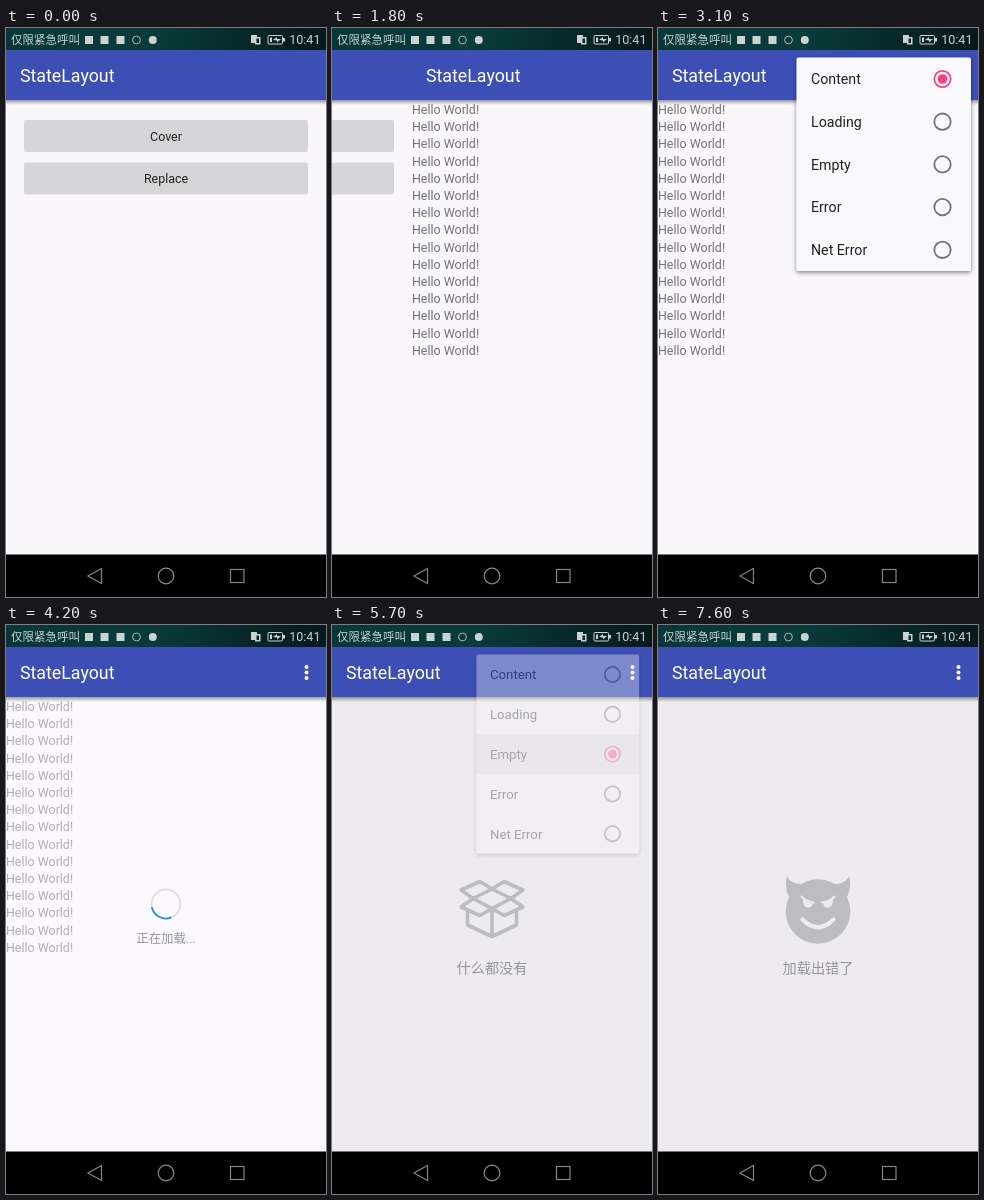
An HTML page that plays this animation: 320x569 px, repeating every 8 s.

```html
<!DOCTYPE html>
<html lang="en">
<head>
<meta charset="utf-8">
<title>State layout demo</title>
<style>
  html, body { margin: 0; width: 100%; height: 100%; overflow: hidden; background: #000; }
  svg { display: block; width: 100%; height: 100%; }
  text { font-family: Roboto, "Noto Sans CJK SC", "Noto Sans CJK", sans-serif; }
  .title { font-size: 17.8px; fill: #fff; }
  .small { font-size: 12.44px; }
  .item { font-size: 14.2px; fill: #212121; }
  .hint { fill: #969597; text-anchor: middle; }
  .nav { fill: none; stroke: #858585; stroke-width: 1.2; }
  .line { fill: none; stroke: #bdbcbe; stroke-width: 3.6; stroke-linejoin: round; }
</style>
</head>
<body>
<svg viewBox="0 0 320 569" preserveAspectRatio="none">
  <defs>
    <linearGradient id="barFill">
      <stop offset="0" stop-color="#06383a"/>
      <stop offset=".45" stop-color="#093b3b"/>
      <stop offset="1" stop-color="#06181b"/>
    </linearGradient>
    <linearGradient id="fade" x2="0" y2="1">
      <stop offset="0" stop-color="#000" stop-opacity=".38"/>
      <stop offset="1" stop-color="#000" stop-opacity="0"/>
    </linearGradient>
    <filter id="lift" x="-10%" y="-10%" width="120%" height="120%">
      <feDropShadow dx="0" dy="1.5" stdDeviation="2" flood-opacity=".5"/>
    </filter>
  </defs>

  <rect id="paper" width="320" height="569"/>
  <rect y="22" width="320" height="50" fill="#3d4fb4"/>
  <rect y="72" width="320" height="5" fill="url(#fade)"/>

  <g id="home">
    <text class="title" x="14" y="54">StateLayout</text>
    <rect id="cover" x="18" y="92" width="284" height="32" rx="2"/>
    <rect x="18" y="134.5" width="284" height="32" rx="2" fill="#d6d5d7"/>
    <g class="small" fill="#222" text-anchor="middle">
      <text x="160" y="112.5">Cover</text>
      <text x="160" y="155.3">Replace</text>
    </g>
  </g>

  <g id="detail">
    <text class="title" x="14" y="54">StateLayout</text>
    <circle id="tap" cx="301" cy="47.5" r="20" fill="#fff" opacity=".16"/>
    <g fill="#fff">
      <circle cx="300.5" cy="42" r="2"/>
      <circle cx="300.5" cy="47.5" r="2"/>
      <circle cx="300.5" cy="53" r="2"/>
    </g>
    <g id="list" class="small" fill="#737274"></g>

    <g id="loading">
      <circle cx="160" cy="279" r="14.5" fill="none" stroke="#dad9db" stroke-width="1.6"/>
      <path id="arc" fill="none" stroke="#2196e3" stroke-width="1.8"/>
      <text class="small hint" x="160" y="317.5">正在加载...</text>
    </g>

    <g id="empty">
      <path class="line" d="M160 264L179 273.5L160 283.5L141 273.5Z
        M141 273.5L129 265L148 256.5L160 264L172 256.5L191 265L179 273.5L191 282L172 290.5L160 283.5L148 290.5L129 282Z
        M135.5 286V300L160 311.5L184.5 300V286 M160 284V311"/>
      <text class="item hint" style="fill:#969597" x="160" y="347.5">什么都没有</text>
    </g>

    <g id="error">
      <g fill="#bdbcbe">
        <circle cx="160" cy="286.5" r="32.3"/>
        <path d="M129 251Q126 262 131 272L146 259Q133 260 129 251Z"/>
        <path d="M191 251Q194 262 189 272L174 259Q187 260 191 251Z"/>
      </g>
      <g fill="none" stroke="#edebee" stroke-linecap="round">
        <path d="M144.5 294.5Q160 310 175.5 294.5" stroke-width="4.2"/>
        <path d="M143.5 271.5Q148 277 156 277.5M176.5 271.5Q172 277 164 277.5" stroke-width="2"/>
      </g>
      <g fill="#edebee">
        <path d="M145 274Q149 278 155 278Q154 283 149.500 282.500Q144.500 281 145 274Z"/>
        <path d="M175 274Q171 278 165 278Q166 283 170.500 282.500Q175.500 281 175 274Z"/>
      </g>
      <text class="item hint" style="fill:#969597" x="160" y="347.5">加载出错了</text>
    </g>
  </g>

  <g id="menu">
    <rect x="138.500" y="29.500" width="174.500" height="213.500" rx="2" fill="#f9f8fa" filter="url(#lift)"/>
    <rect id="ripple" x="138.500" width="174.500" height="42.700" fill="#000" opacity=".09"/>
    <g id="rows"></g>
  </g>

  <rect width="320" height="22" fill="url(#barFill)"/>
  <g fill="#c9d3d3">
    <text x="5" y="16.200" font-size="11.500">仅限紧急呼叫</text>
    <rect x="79" y="8" width="8" height="8"/>
    <rect x="94.500" y="8" width="8" height="8"/>
    <rect x="110.500" y="8" width="8" height="8"/>
    <circle cx="130.500" cy="12" r="3.900" fill="none" stroke="#a9b8b8"/>
    <circle cx="146.800" cy="12" r="4"/>
    <path d="M245 7H251V9H254.500V16.500H249V15H245ZM250.500 10.500V15H253V10.500Z" fill-rule="evenodd"/>
    <rect x="262" y="7.500" width="14.500" height="8.500" rx="1" fill="none" stroke="#c9d3d3"/>
    <path d="M277 10H279V13.500H277ZM264 9.500H266V14H264ZM267 12L271 9V11H275L271 14.500V12.500Z"/>
    <text x="283.300" y="16.300" font-size="12.500">10:41</text>
  </g>

  <rect y="526.500" width="320" height="42.500" fill="#000"/>
  <path class="nav" d="M95.500 540.500V555.500L82 548Z"/>
  <circle class="nav" cx="160" cy="548" r="7.800"/>
  <rect class="nav" x="224.500" y="541.500" width="13.500" height="13"/>
</svg>

<script>
const LOOP = 8000, STEP = 100;
const LABELS = ["Content", "Loading", "Empty", "Error", "Net Error"];
const ROW = 42.7, FIRST = 51;
const PAPER = ["#f9f7fa", "#fbf9fc", "#edebee", "#edebee"];

// Each menu visit: finger on the dots, then on a row.
const VISITS = [
  { tap: 2600, pick: 3600, row: 1 },
  { tap: 4500, pick: 5500, row: 2 },
  { tap: 6300, pick: 7300, row: 3 }
];

const $ = id => document.getElementById(id);
const set = (id, attrs) => {
  for (const key in attrs) $(id).setAttribute(key, attrs[key]);
};
const show = (id, on) => set(id, { display: on ? "inline" : "none" });
const clamp = x => Math.min(1, Math.max(0, x));
const mix = (a, b, k) => a + (b - a) * k;

$("list").innerHTML = Array.from({ length: 15 }, (_, i) =>
  `<text x="0" y="${86 + i * 17.2}">Hello World!</text>`).join("");

$("rows").innerHTML = LABELS.map((label, i) => {
  const y = FIRST + i * ROW;
  return `<text class="item" x="153" y="${y + 5.3}">${label}</text>
    <circle class="ring" cx="284.5" cy="${y}" r="8.2" fill="none" stroke-width="1.8"/>
    <circle class="dot" cx="284.5" cy="${y}" r="4.8" fill="#f93f7d"/>`;
}).join("");
const rings = document.querySelectorAll(".ring");
const dots = document.querySelectorAll(".dot");

function drawArc(t) {
  const mid = 118 + (t - 4200) * 117 / 700;
  const span = 135 + 35 * Math.sin((t - 4550) / 700 * Math.PI);
  const point = deg => {
    const a = deg * Math.PI / 180;
    return `${160 + 14.5 * Math.cos(a)} ${279 + 14.5 * Math.sin(a)}`;
  };
  set("arc", { d: `M${point(mid - span / 2)}A14.5 14.5 0 0 1 ${point(mid + span / 2)}` });
}

// Opacity of the popup while it opens and closes.
function menuAlpha(t, { tap, pick }) {
  const opening = t - tap - 200, closing = t - pick - 100;
  if (opening < 0 || closing >= 200) return 0;
  if (closing >= 0) return closing < 100 ? 0.85 : 0.35;
  return opening < 100 ? 0.35 : opening < 200 ? 0.85 : 1;
}

function drawMenu(t, state) {
  const visit = VISITS.find(v => t >= v.tap && t < v.pick + 300);
  const alpha = visit ? menuAlpha(t, visit) : 0;
  show("tap", visit && t < visit.tap + 300);
  show("menu", alpha > 0);
  if (!alpha) return;

  const scale = mix(0.895, 1, alpha);
  set("menu", {
    opacity: alpha,
    transform: `translate(225.7 29.5) scale(${scale}) translate(-225.7 -29.5)`
  });
  show("ripple", t >= visit.pick);
  set("ripple", { y: FIRST + (visit.row - 0.5) * ROW });
  rings.forEach((ring, i) => {
    ring.setAttribute("stroke", i === state ? "#f93f7d" : "#737274");
    dots[i].setAttribute("display", i === state ? "inline" : "none");
  });
}

function render(t) {
  const state = VISITS.filter(v => t >= v.pick + 100).length;
  const slide = 1 - (1 - clamp((t - 1500) / 600)) ** 2;

  set("paper", { fill: PAPER[state] });
  set("home", { transform: `translate(${-320 * slide} 0)` });
  set("detail", { transform: `translate(${320 * (1 - slide)} 0)` });
  set("cover", { fill: t >= 1400 && t < 1700 ? "#c9c8ca" : "#d6d5d7" });

  show("list", state < 2);
  set("list", { opacity: state ? 0.55 : 1 });
  show("loading", state === 1);
  show("empty", state === 2);
  show("error", state === 3);
  drawArc(t);
  drawMenu(t, state);
}

const start = performance.now();
function tick(now) {
  const t = Math.max(0, now - start) % LOOP;
  render(Math.floor(t / STEP) * STEP);
  requestAnimationFrame(tick);
}
render(0);
requestAnimationFrame(tick);
</script>
</body>
</html>
```
